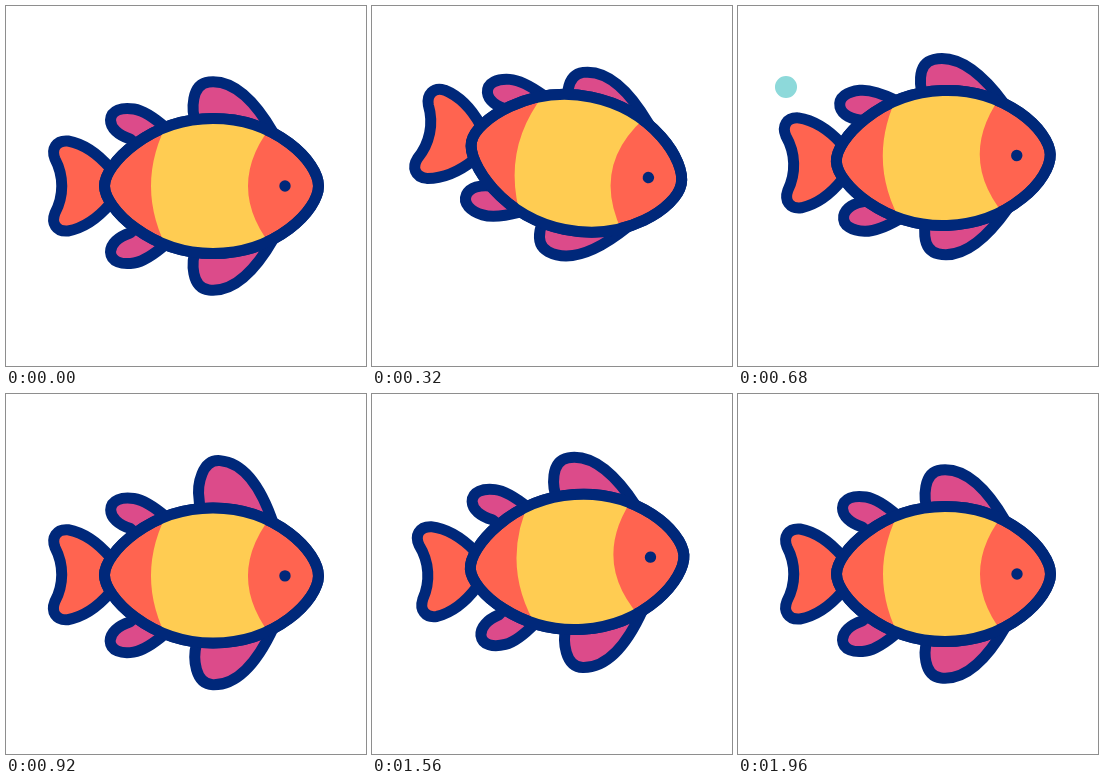
These frames come from a looping animation (360x360 px, 2000 ms). An HTML page:

```html
<!DOCTYPE html>
<html lang="en">
<head>
<meta charset="utf-8">
<title>Swimming fish</title>
<style>
  html, body { margin: 0; width: 100%; height: 100%; overflow: hidden; background: #fff; }
  svg { display: block; width: 100vw; height: 100vh; }
  #fish { stroke: #00287a; stroke-width: 11; stroke-linecap: round; stroke-linejoin: round; }
  .fin { fill: #dc4b8a; }
  .coral { fill: #ff6450; }
  .yellow { fill: #ffcc52; stroke: none; }
  .eye { fill: #00287a; stroke: none; }
  #bubbles { fill: none; stroke: #8dd9da; }
</style>
</head>
<body>
<svg viewBox="0 0 360 360">
  <defs>
    <path id="body" d="M98.5 180C98.5 158 144 112.5 207 112.5S312.5 156 312.5 180S270 247.5 207 247.5S98.5 202 98.5 180Z"/>
    <path id="front" d="M198 146L190 118C185 104 185 78 203 76C230 73 252 100 268 128L256 150Z"/>
    <path id="back" d="M146 152L124 133C112 129 104.5 122 104.5 114C105 104 116 101 128 103C140 105 152 115 160 122L166 146Z"/>
    <clipPath id="inside"><use href="#body"/></clipPath>
  </defs>
  <g id="bubbles"></g>
  <g id="fish">
    <path class="coral" d="M104 162C92 148 78 138 62 135C50 134 45 143 49 153C58 170 58 190 49 207C45 217 50 226 62 225C78 222 92 212 104 198"/>
    <g class="fin">
      <use id="backTop" href="#back"/>
      <use id="frontTop" href="#front"/>
      <g transform="matrix(1 0 0 -1 0 360)">
        <use id="backLow" href="#back"/>
        <use id="frontLow" href="#front"/>
      </g>
    </g>
    <use class="coral" href="#body"/>
    <path class="yellow" clip-path="url(#inside)" d="M164 112Q126 180 164 248H272Q212 180 272 112Z"/>
    <use href="#body" fill="none"/>
    <circle class="eye" cx="279" cy="180" r="5.7"/>
  </g>
</svg>
<script>
  const LOOP = 2000, STEP = 40;
  const times = [0, 160, 320, 480, 580, 760, 920, 1120, 1240, 1400, 1560, 1760, 1960];
  const tracks = {
    y: [180, 172, 157, 145, 142, 164, 181.5, 181, 171, 163.5, 168, 176.5, 180],
    tilt: [0, 10.3, 11.5, 8, 3, -4, 0.3, 0.5, 8.7, 5, -3.8, -3, 0],
    frontTop: [0, -7, -12, -14.6, -12, 2, 11, 9, 4, 2, 0.5, 0, 0],
    frontLow: [0, -3, -10, -14.6, -12, -3, 5, 7, 5.5, 3, 1.5, 0.5, 0],
    backTop: [0, -6, -17, -24, -20, -8, -1, -2, -3, 0, 1.5, 1, 0],
    backLow: [0, -5, -15, -22, -19, -8, 0, 4, 6, 4, 1, 0, 0]
  };
  const pivots = { frontTop: "265 125", frontLow: "265 125", backTop: "154 122", backLow: "154 122" };
  const bubbles = [
    { x: 52.5, y: 307, start: 360 },
    { x: 308, y: 288, start: 480 },
    { x: 48, y: 81, start: 640 }
  ];
  const BUBBLE_LIFE = 200, BUBBLE_SIZE = 35.7;
  const $ = id => document.getElementById(id);

  for (const b of bubbles) {
    b.node = document.createElementNS("http://www.w3.org/2000/svg", "circle");
    b.node.setAttribute("cx", b.x);
    b.node.setAttribute("cy", b.y);
    $("bubbles").append(b.node);
  }

  // Smooth cubic through the keys, flat at each peak and at both ends.
  function sample(keys, t) {
    const last = times.length - 1;
    if (t >= times[last]) return keys[last];
    const i = times.findIndex(k => k > t) - 1;
    const rate = k => (keys[k + 1] - keys[k]) / (times[k + 1] - times[k]);
    const slope = k => {
      if (k === 0 || k === last) return 0;
      const a = rate(k - 1), b = rate(k);
      return a * b <= 0 ? 0 : 2 * a * b / (a + b);
    };
    const h = times[i + 1] - times[i], u = (t - times[i]) / h, v = 1 - u;
    return v * v * (1 + 2 * u) * keys[i] + u * u * (3 - 2 * u) * keys[i + 1]
      + h * u * v * (v * slope(i) - u * slope(i + 1));
  }

  function drawBubble(b, t) {
    const u = (t - b.start) / BUBBLE_LIFE;
    const on = u > 0 && u < 1;
    b.node.style.display = on ? "" : "none";
    if (!on) return;
    const outer = BUBBLE_SIZE * Math.sin(u * Math.PI / 2);
    const line = Math.min(outer, 30 * (1 - u));
    b.node.setAttribute("r", outer - line / 2);
    b.node.setAttribute("stroke-width", line);
  }

  function draw(t) {
    const tilt = sample(tracks.tilt, t);
    const x = 206 - Math.abs(tilt) * 0.1, y = sample(tracks.y, t);
    $("fish").setAttribute("transform", `translate(${x} ${y}) rotate(${tilt}) translate(-206 -180)`);
    for (const id in pivots)
      $(id).setAttribute("transform", `rotate(${sample(tracks[id], t)} ${pivots[id]})`);
    for (const b of bubbles) drawBubble(b, t);
  }

  const origin = performance.now();
  function tick() {
    const t = (performance.now() - origin) % LOOP;
    draw(Math.floor(t / STEP) * STEP);
    requestAnimationFrame(tick);
  }
  tick();
</script>
</body>
</html>
```
